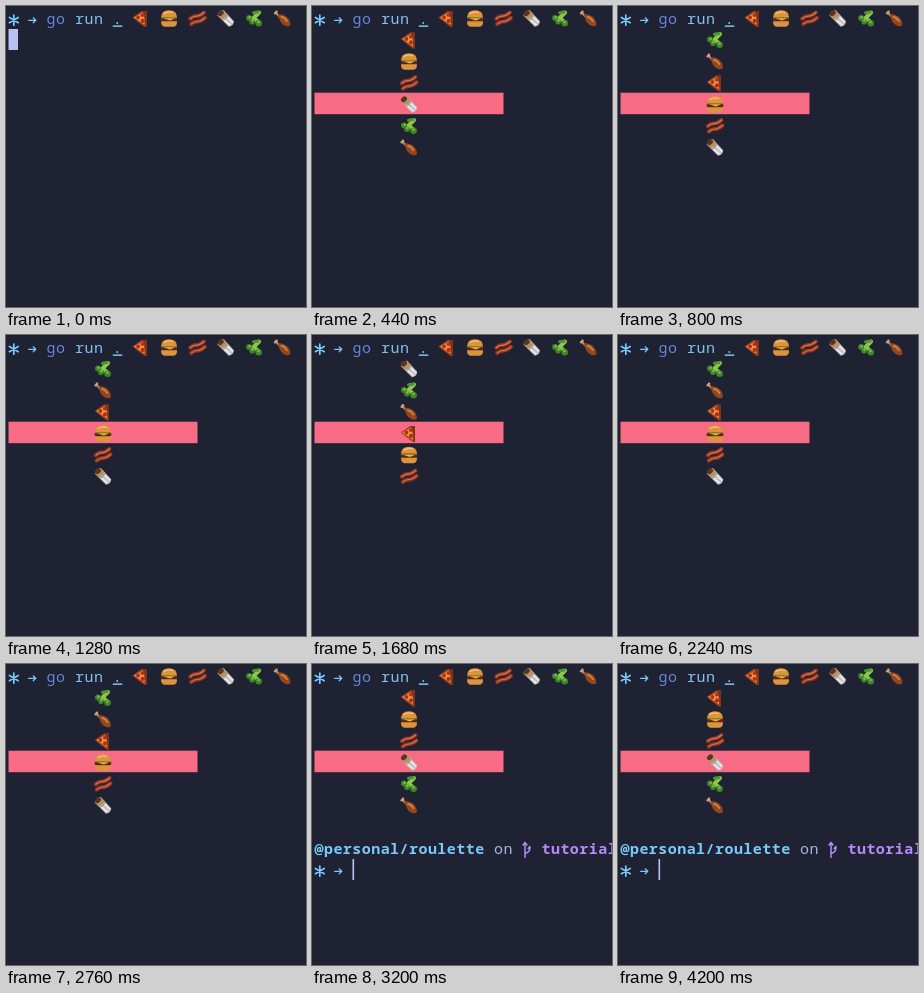
Write an HTML page that moves like this. It is 300 px wide and 301 px high and loops after 4.52 s.

```html
<!DOCTYPE html>
<html lang="en">
<head>
<meta charset="utf-8">
<title>Food roulette</title>
<style>
  html, body { margin: 0; width: 100%; height: 100%; overflow: hidden; background: #1f2232; }
  svg { display: block; width: 300px; height: 301px; }
  text { font: 15px "Noto Sans Mono", "DejaVu Sans Mono", monospace; letter-spacing: .45px; white-space: pre; }
  .bold { font-weight: 700; }
  .line { fill: none; stroke-linecap: round; stroke-linejoin: round; }
</style>
</head>
<body>
<svg viewBox="0 0 300 301">
  <defs>
    <g id="prompt" class="line" stroke="#79c9fb">
      <path d="M7.8 9V19.2M3.4 11.5L12.2 16.7M12.2 11.5L3.4 16.7" stroke-width="1.7"/>
      <path d="M22.6 14.3H29.6M27.2 11.8L29.8 14.3L27.2 16.8" stroke-width="1.2"/>
    </g>

    <!-- Each food fills an 18 x 18 box. -->
    <g id="pizza">
      <path d="M.8 8L10 1.5H15V17.5H13Q6 12.5 .8 8Z" fill="#a8441c"/>
      <path d="M2.4 8L11 3.2Q13.4 8.5 13 15.3Z" fill="#e59a45"/>
      <path d="M12 1.5H15V17.5H13.4Q14.4 8 11 2Z" fill="#7d3318"/>
      <g fill="#b92a18">
        <circle cx="6.4" cy="8" r="1.9"/><circle cx="10.7" cy="5.8" r="1.8"/><circle cx="11" cy="11.4" r="2.1"/>
      </g>
    </g>
    <g id="burger">
      <path d="M1 8Q1.2 .8 9 .8T17 8Z" fill="#e0923c"/>
      <path d="M4 4Q8 1.2 12.5 3" class="line" stroke="#f6c27a" stroke-width="1.3"/>
      <rect x=".7" y="7.4" width="16.6" height="4.8" rx="2" fill="#5a2916"/>
      <path d="M1.6 8.2H16.4" class="line" stroke="#8d9c35" stroke-width="1"/>
      <path d="M3 8.8H15L10 11Z" fill="#f0b53a"/>
      <path d="M1 11.8H17Q17 17.2 13.5 17.2H4.5Q1 17.2 1 11.8Z" fill="#dd9340"/>
    </g>
    <g id="bacon" class="line">
      <g id="strip">
        <path d="M1.8 9.2Q5 6.4 8 6.6T15.5 3" stroke="#97361f" stroke-width="4"/>
        <path d="M2 9Q5.2 6.4 8.1 6.6T15.5 3" stroke="#d97758" stroke-width="1.2"/>
      </g>
      <use href="#strip" x="1" y="5.4"/>
    </g>
    <g id="burrito">
      <path d="M.8 6Q1.6 1 7 .8L17.2 11.8Q17 16.4 12 17.2Z" fill="#c4c2c0"/>
      <path d="M.8 6Q1.6 1 7 .8L10.6 4.8Q9.5 8.5 4.8 10Z" fill="#b98e60"/>
      <ellipse cx="4" cy="3.8" rx="3.3" ry="2.4" transform="rotate(-42 4 3.8)" fill="#573522"/>
      <path d="M7.5 10.5L13 15.2M10.5 7.5L15.5 12.5" class="line" stroke="#eeedec" stroke-width="1.6"/>
      <path d="M6.5 10.8Q9.5 9.5 11 6.2" class="line" stroke="#858385" stroke-width=".9"/>
    </g>
    <g id="broccoli">
      <path d="M14 3L8.5 8.5L13 12" class="line" stroke="#8cc84a" stroke-width="4"/>
      <path d="M8.5 3.2L13 2.6" class="line" stroke="#4f9430" stroke-width="3"/>
      <g fill="#3f8529">
        <circle cx="4" cy="8.6" r="3"/><circle cx="7" cy="12.2" r="2.8"/><circle cx="13.6" cy="13.8" r="3.3"/>
      </g>
      <g fill="#79ba43">
        <circle cx="4.6" cy="7.8" r="1.4"/><circle cx="7.4" cy="11" r="1.4"/><circle cx="13.4" cy="12.6" r="1.4"/>
      </g>
    </g>
    <g id="chicken">
      <path d="M2.2 3L6 7" class="line" stroke="#b98a67" stroke-width="2"/>
      <circle cx="1.8" cy="3.8" r="1.3" fill="#c9a384"/><circle cx="3" cy="2.4" r="1.3" fill="#c9a384"/>
      <path d="M4.4 5Q9 3.8 13.2 7.2Q17.2 11 16.8 15.4Q16 17.2 13.4 16.8Q8.5 15.5 6.6 11.6Q5.6 9 4.4 5Z" fill="#94471f"/>
      <path d="M8 7.4Q11.4 8 13.4 11.6" class="line" stroke="#d08442" stroke-width="1.9"/>
    </g>
  </defs>

  <use href="#prompt"/>
  <text x="40.6" y="18.4" fill="#6487d8">go</text>
  <text x="69" y="18.4" fill="#84c2ee">run <tspan text-decoration="underline">.</tspan></text>
  <g id="args"></g>

  <rect id="block" x="2.5" y="23" width="9.5" height="21" fill="#b9bff5"/>

  <g id="wheel">
    <rect x="2.5" y="86.7" width="189" height="21.5" fill="#f86b85"/>
  </g>

  <g id="done">
    <text class="bold" x="2.5" y="190.2" fill="#79c9fb">@personal/roulette</text>
    <text x="182" y="190.2" fill="#a9b4dc">on</text>
    <g class="line" stroke="#b58cf6" stroke-width="1.5">
      <path d="M213 178.5V193.5M213 189.5Q218 188.5 218 183M211 181L213 178.5L215 181M216.2 184.5L218 182.5"/>
    </g>
    <text class="bold" x="229.5" y="190.2" fill="#b58cf6">tutorial</text>
    <use href="#prompt" y="193"/>
    <rect x="40.5" y="195" width="1.6" height="21" fill="#b9c3f2"/>
  </g>
</svg>
<script>
const LOOP = 4520, FRAME = 40, START = 200, STOP = 3000, ROW = 21.5;
const foods = ["pizza", "burger", "bacon", "burrito", "broccoli", "chicken"];
const $ = id => document.getElementById(id);

// [time in ms, rows the wheel has rolled down so far]
const spin = [
  [START, 0], [440, 12], [480, 12], [720, 24], [760, 24], [800, 26],
  [1280, 50], [1680, 69], [2240, 98], [2760, 122], [STOP, 132]
];

function addFood(parent, name, x, y) {
  const use = document.createElementNS("http://www.w3.org/2000/svg", "use");
  use.setAttribute("href", "#" + name);
  use.setAttribute("x", x);
  use.setAttribute("y", y);
  return parent.appendChild(use);
}

foods.forEach((name, i) => addFood($("args"), name, 125.7 + i * 28.35, 3.5));
const slots = foods.map((name, i) => addFood($("wheel"), name, 88, 25 + i * ROW));

function rolled(t) {
  if (t >= STOP) return spin[spin.length - 1][1];
  const i = spin.findIndex(([end]) => t < end);
  const [t0, s0] = spin[i - 1], [t1, s1] = spin[i];
  return Math.round(s0 + (s1 - s0) * (t - t0) / (t1 - t0));
}

function show(id, on) {
  $(id).style.display = on ? "" : "none";
}

function draw() {
  const now = performance.now() % LOOP;
  const t = Math.floor(now / FRAME) * FRAME;
  show("block", t < START);
  show("wheel", t >= START);
  show("done", t >= STOP);
  if (t >= START) {
    const top = 6 - rolled(t) % 6;
    slots.forEach((slot, i) => slot.setAttribute("href", "#" + foods[(top + i) % 6]));
  }
  requestAnimationFrame(draw);
}
draw();
</script>
</body>
</html>
```
